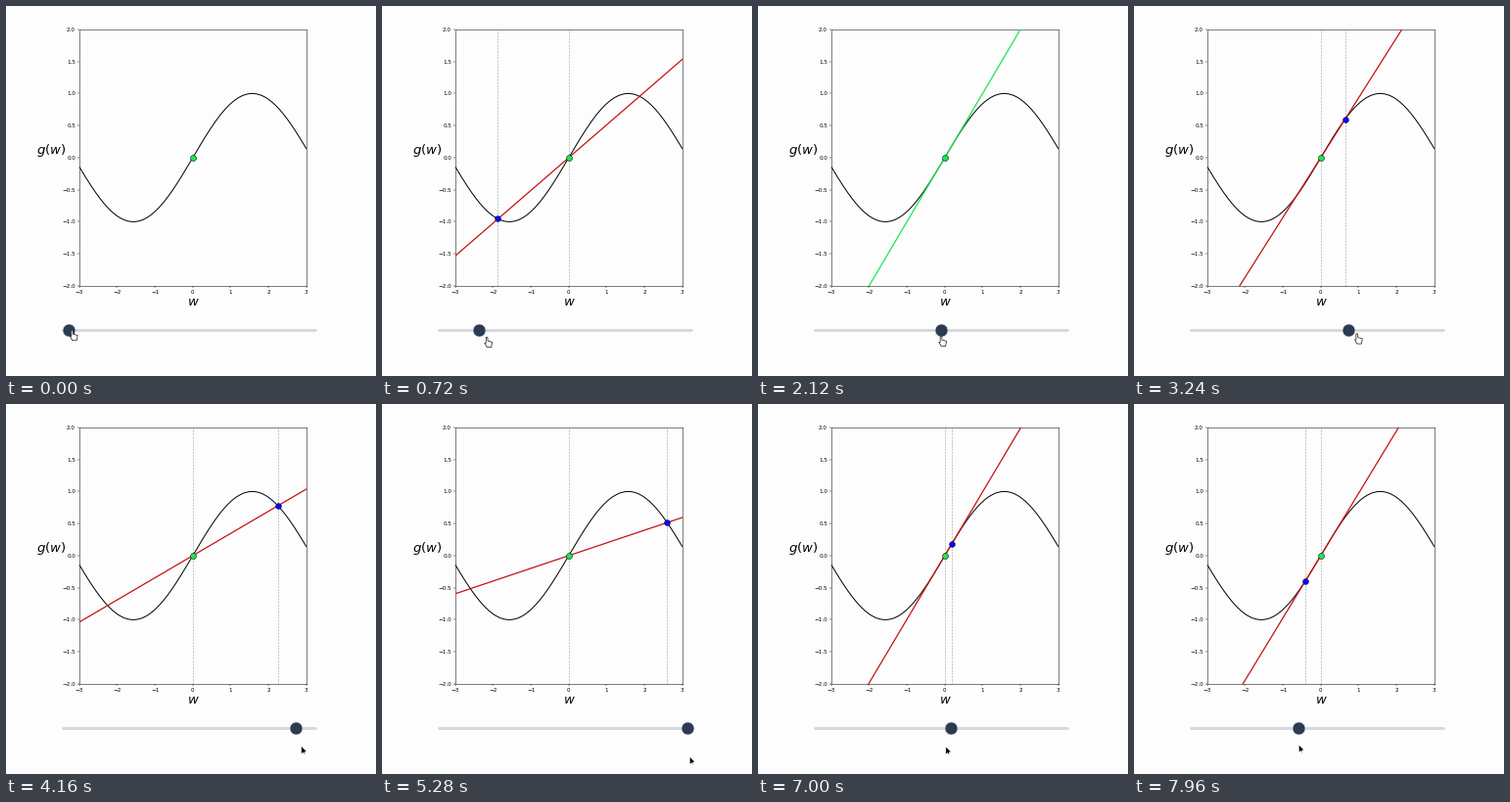
Write a matplotlib script that moves like this. It is 378 by 378 pixels and loops after 8 s.

```python
import numpy as np
import matplotlib.pyplot as plt
from matplotlib.animation import FuncAnimation
from matplotlib.patches import Polygon

SIZE = 378
STEP = 40
FRAMES = 200
LEAD = .13          # seconds the pointer runs ahead of the knob
LIMIT = 2.6         # slider range
BG = "#fdfdfe"
GREEN = "#1ee650"
RED = "#c31212"


def glide(t, keys):
    """Smooth monotone path through (time, value) keys."""
    x, y = np.array(keys).T
    h = np.diff(x)
    d = np.diff(y) / h
    a, b = d[:-1], d[1:]
    inner = np.where(a * b > 0, 2 * a * b / (a + b + 1e-12), 0)
    m = np.concatenate([d[:1] / 2, inner, d[-1:] / 2])
    t = np.clip(t, x[0], x[-1])
    i = min(np.searchsorted(x, t, side="right") - 1, len(h) - 1)
    s = (t - x[i]) / h[i]
    ease = s * s * (3 - 2 * s)
    bend = s * (1 - s) * ((1 - s) * m[i] - s * m[i + 1])
    return y[i] + ease * (y[i + 1] - y[i]) + bend * h[i]


DRAG = [(0, -2.6), (.72, -1.87), (1.68, -.36), (2.05, -.03), (2.55, -.01),
        (3.24, .64), (4.16, 2.25), (5.1, 2.88), (6.12, 1.345), (6.72, .44),
        (7.96, -.41)]
TIP_Y = [(0, 331.5), (1.1, 340.5), (3.1, 334.5), (5.05, 361), (6.12, 353),
         (7.96, 348)]


def slider_x(v):
    return 188 + v / .0209


plt.rcParams["font.family"] = "DejaVu Sans"
plt.rcParams["mathtext.fontset"] = "dejavusans"

fig = plt.figure(figsize=(SIZE / 72, SIZE / 72), dpi=72, facecolor=BG)

ax = fig.add_axes([74.8 / SIZE, 1 - 285.9 / SIZE, 232 / SIZE, 262 / SIZE],
                  facecolor=BG)
ax.set(xlim=(-3, 3), ylim=(-2, 2), xticks=range(-3, 4),
       yticks=np.arange(-2, 2.1, .5))
ax.tick_params(labelsize=5.6, length=2, width=.45, pad=1.9)
for spine in ax.spines.values():
    spine.set_linewidth(.5)

w = np.linspace(-3, 3, 300)
ax.plot(w, np.sin(w), color="black", lw=1, zorder=2)
line, = ax.plot([], [], lw=1.25, zorder=3)
guides = [ax.axvline(0, color="#a4a4a4", lw=.6, ls=(0, (3.7, 1.6)), zorder=1)
          for _ in range(2)]
ax.plot(0, 0, "o", ms=6, mfc=GREEN, mec="black", mew=.5, zorder=6)
blue, = ax.plot([], [], "o", ms=5.8, mfc="#0a0af0", mec="#000050", mew=.5,
                zorder=5)

# overlay in pixels, y pointing down
page = fig.add_axes([0, 0, 1, 1])
page.set(xlim=(0, SIZE), ylim=(SIZE, 0))
page.axis("off")
page.text(46.4, 151.5, "$g(w)$", size=13.3, ha="center", va="baseline")
page.text(191.2, 306.5, "$w$", size=13.3, ha="center", va="baseline")
page.plot([57.6, 316.4], [331, 331], color="#d4d7dd", lw=2.8,
          solid_capstyle="round")
knob, = page.plot([], [], "o", ms=13, mfc="#2b3b50", mec="#dfe3ea", mew=.7)

ARROW = np.array([(0, 0), (0, 8), (2, 6.4), (3.6, 9.4), (3.4, 5.8), (5.6, 5.6)])
HAND = np.array([(-.8, 0), (.8, 0), (1, 3.7), (5.6, 5), (4.6, 10.2), (.2, 10.2),
                 (-2.2, 6), (-.8, 6)])
arrow = page.add_patch(Polygon(ARROW, fc="black", ec="white", lw=.5, zorder=9))
hand = page.add_patch(Polygon(HAND, fc="white", ec="#303030", lw=.8, zorder=9,
                              joinstyle="round"))


def draw(i):
    t = i * STEP / 1000
    v = np.clip(glide(t, DRAG), -LIMIT, LIMIT)
    knob.set_data([slider_x(v)], [331])

    tangent = abs(v) < .04
    slope = 1 if tangent else np.sin(v) / v
    line.set_data([-3, 3], [-3 * slope, 3 * slope])
    line.set_color(GREEN if tangent else RED)
    line.set_visible(i > 0)
    guides[1].set_xdata([v, v])
    blue.set_data([v], [np.sin(v)])
    for part in (*guides, blue):
        part.set_visible(i > 0 and not tangent)

    tip = slider_x(glide(t + LEAD, DRAG)), glide(t, TIP_Y)
    pointing = tip[1] < 344
    hand.set_xy(HAND + tip)
    hand.set_visible(pointing)
    arrow.set_xy(ARROW + tip)
    arrow.set_visible(not pointing)
    return line, blue, knob, arrow, hand, *guides


anim = FuncAnimation(fig, draw, frames=FRAMES, interval=STEP, repeat=True,
                     repeat_delay=0, blit=False)
plt.show()
```
